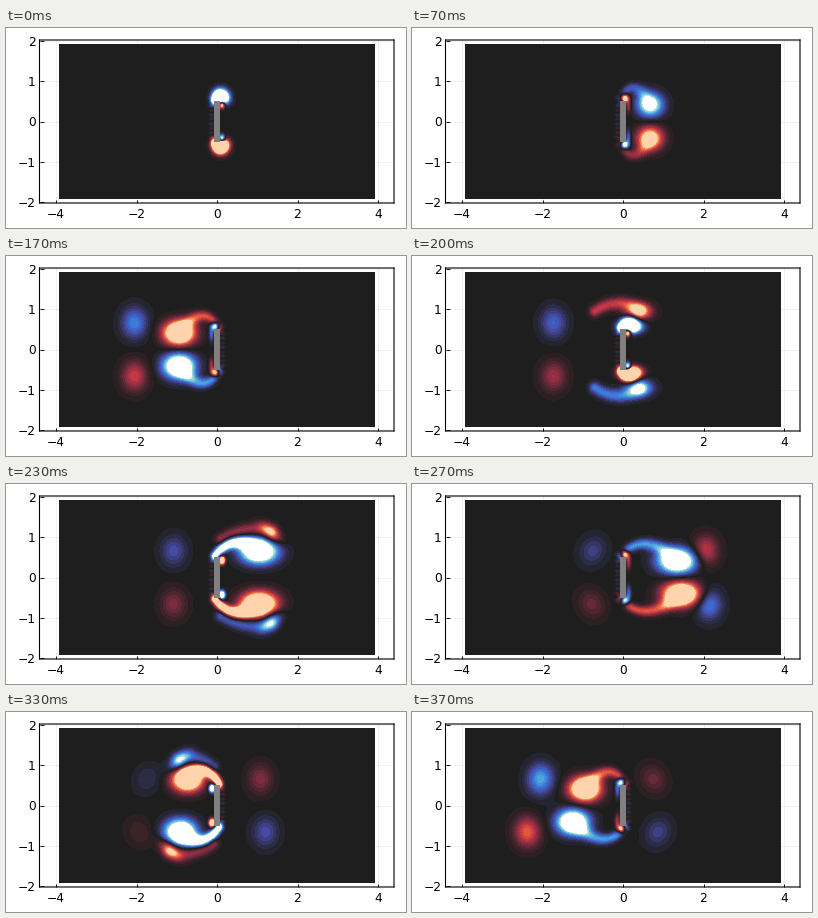
Animation, 400 px wide and 200 px high, one loop 410 ms. Source, as a matplotlib script:

```python
import numpy as np
import matplotlib.pyplot as plt
from matplotlib.animation import FuncAnimation
from matplotlib.colors import LinearSegmentedColormap
from matplotlib.patches import Rectangle

W, H, DPI = 400, 200, 100
CX, CY, UNIT = 211, 93.5, 40.25    # pixel of the origin, pixels per unit
NX, NY = 316, 155                  # pixels of the flow field
HALF_X, HALF_Y = NX / 2 / UNIT, NY / 2 / UNIT
PT = 72 / DPI
STEPS, STROKE = 12, 3              # the flow reverses after every stroke

# Path and size of a vortex in its first steps, x along the flow at its birth.
KEY_X = [0.2, 1.05, 1.35, -0.4, -1.35]
KEY_Y = [0.57, 0.65, 0.41, 0.95, 1.1]
KEY_RX = [0.26, 0.44, 0.45, 0.32, 0.32]
KEY_RY = [0.15, 0.29, 0.29, 0.2, 0.16]

X, Y = np.meshgrid((np.arange(NX) - NX / 2 + 0.5) / UNIT,
                   (np.arange(NY) - NY / 2 + 0.5) / UNIT)


def blob(a, x, y, rx, ry, tilt=0):
    """Elliptic Gaussian vortex of strength a."""
    c, s = np.cos(np.radians(tilt)), np.sin(np.radians(tilt))
    dx, dy = X - x, Y - y
    return a * np.exp(-((dx * c + dy * s) / rx) ** 2 - ((dy * c - dx * s) / ry) ** 2)


def arc(a, p0, p1, p2, w0, w1):
    """Shear layer along a quadratic Bezier curve, width w0 to w1."""
    q = np.full(X.shape, np.inf)
    for t in np.linspace(0, 1, 32):
        x, y = [(1 - t) ** 2 * u + 2 * t * (1 - t) * v + t * t * w
                for u, v, w in zip(p0, p1, p2)]
        w = w0 + (w1 - w0) * t
        q = np.minimum(q, ((X - x) ** 2 + (Y - y) ** 2) / w ** 2)
    return a * np.exp(-q)


def direction(k):
    return 1 if k // STROKE % 2 == 0 else -1


def reach(k):
    """Length of the current stroke; the first one starts from rest."""
    return 0.5 if k < STROKE else 1 if direction(k) > 0 else 0.7


def vortex(born, k, lean):
    """Upper vortex shed in the stroke that began at step born."""
    age, s = k - born, direction(born)
    stretch = reach(k) * (1 + lean)

    if age >= 5:
        # Old vortices fade and sway with the flow.
        x = -s * (1.4 + 0.65 * np.cos(2 * np.pi * (age - 5) / (2 * STROKE))) * (1 + lean / 2)
        tilt = 30 * np.sign(x) if age >= 8 else 0
        return blob(-s * 0.58 * 0.78 ** (age - 5), x, 0.66, 0.32, 0.38, tilt)

    x, y = s * KEY_X[age] * stretch, KEY_Y[age]
    rx, ry = KEY_RX[age], KEY_RY[age]
    if age < STROKE:
        # Fed by a layer that leaves the edge of the plate.
        a = -s * (1.9 if born else 1.9 - 0.35 * age)
        layer = a * (0.35 if age == 2 else 0.85)
        return (blob(a, x, y, rx * reach(k) ** 0.5, ry)
                + arc(layer, (-0.06 * s, 0.52), (0.33 * x, y + 0.15 + 0.3 * age),
                      (0.95 * x, y + 0.08), 0.09, 0.17))

    # Carried back over the edge by the reversed flow.
    a = -s * (0.95 if age == 3 else 0.75)
    start = -s * (0.8 * age - 3.1)
    return (blob(a, x, y, rx, ry, 40 * s * (age - 3))
            + arc(0.6 * a, (start, 0.95), ((start + x) / 2, 1.32), (x, y + 0.05), 0.14, 0.17))


def edge(k):
    """Opposite vorticity at the plate and ringing on its upstream side."""
    s = direction(k)
    ringing = (0.08 * s * np.exp(-((X + s * 0.13) / 0.07) ** 2 - (Y / 0.6) ** 8)
               * np.sin(9 * np.pi * Y))
    if k % STROKE == 2:
        return (blob(1.6 * s, 0.04 * s, 0.58, 0.09, 0.1)
                + blob(0.5 * s, 0.14 * s, 0.4, 0.06, 0.2) + ringing)
    return blob(1.9 * s, 0.12 * s, 0.43, 0.08, 0.1) + ringing


def half(k, lean=0):
    return edge(k) + sum(vortex(born, k, lean) for born in range(0, k + 1, STROKE))


def field(k):
    # The lower half mirrors the upper one and slowly drifts out of symmetry.
    return half(k) - half(k, 0.08 * max(0, k - 7))[::-1]


FIELDS = [field(k) for k in range(STEPS)]

COLD = ["#bde7db", "#78c2d8", "#3f98dc", "#3c68d2", "#46489a", "#2f2f4e"]
WARM = ["#41232b", "#742c3d", "#ad3046", "#db4a3b", "#f28246", "#ffd4ac"]
icefire = LinearSegmentedColormap.from_list("ice_fire", COLD + ["#1f1e1e"] + WARM, N=29)
icefire.set_under("white")

plt.rcParams["font.family"] = "DejaVu Sans"
fig = plt.figure(figsize=(W / DPI, H / DPI), dpi=DPI, facecolor="white")
LEFT, RIGHT, TOP, BOTTOM = 33.5, 388, 12, 175
ax = fig.add_axes([LEFT / W, 1 - BOTTOM / H, (RIGHT - LEFT) / W, (BOTTOM - TOP) / H])
image = ax.imshow(FIELDS[0], cmap=icefire, vmin=-1, vmax=1, origin="lower",
                  extent=(-HALF_X, HALF_X, -HALF_Y, HALF_Y), aspect="auto",
                  interpolation="nearest", zorder=2)
ax.add_patch(Rectangle((-0.065, -0.5), 0.13, 1.0, color="#808080", linewidth=0, zorder=3))

ax.set_xlim((LEFT - CX) / UNIT, (RIGHT - CX) / UNIT)
ax.set_ylim((CY - BOTTOM) / UNIT, (CY - TOP) / UNIT)
ax.set_xticks(range(-4, 5, 2))
ax.set_yticks(range(-2, 3))
ax.set_axisbelow(True)
ax.grid(color="black", alpha=0.1, linewidth=0.5 * PT)
ax.tick_params(direction="in", length=3.5 * PT, width=0.9 * PT, labelsize=8.8)
ax.tick_params(axis="x", pad=3.6)
ax.tick_params(axis="y", pad=2.6)
for spine in ax.spines.values():
    spine.set_linewidth(1.1 * PT)
    spine.set_snap(False)


def draw(tick):
    # Ticks last 10 ms; the flow advances 30 times per second.
    image.set_data(FIELDS[min(int((tick + 0.5) * 0.3), STEPS - 1)])
    return [image]


anim = FuncAnimation(fig, draw, frames=41, interval=10, repeat=True, repeat_delay=0)
plt.show()
```
